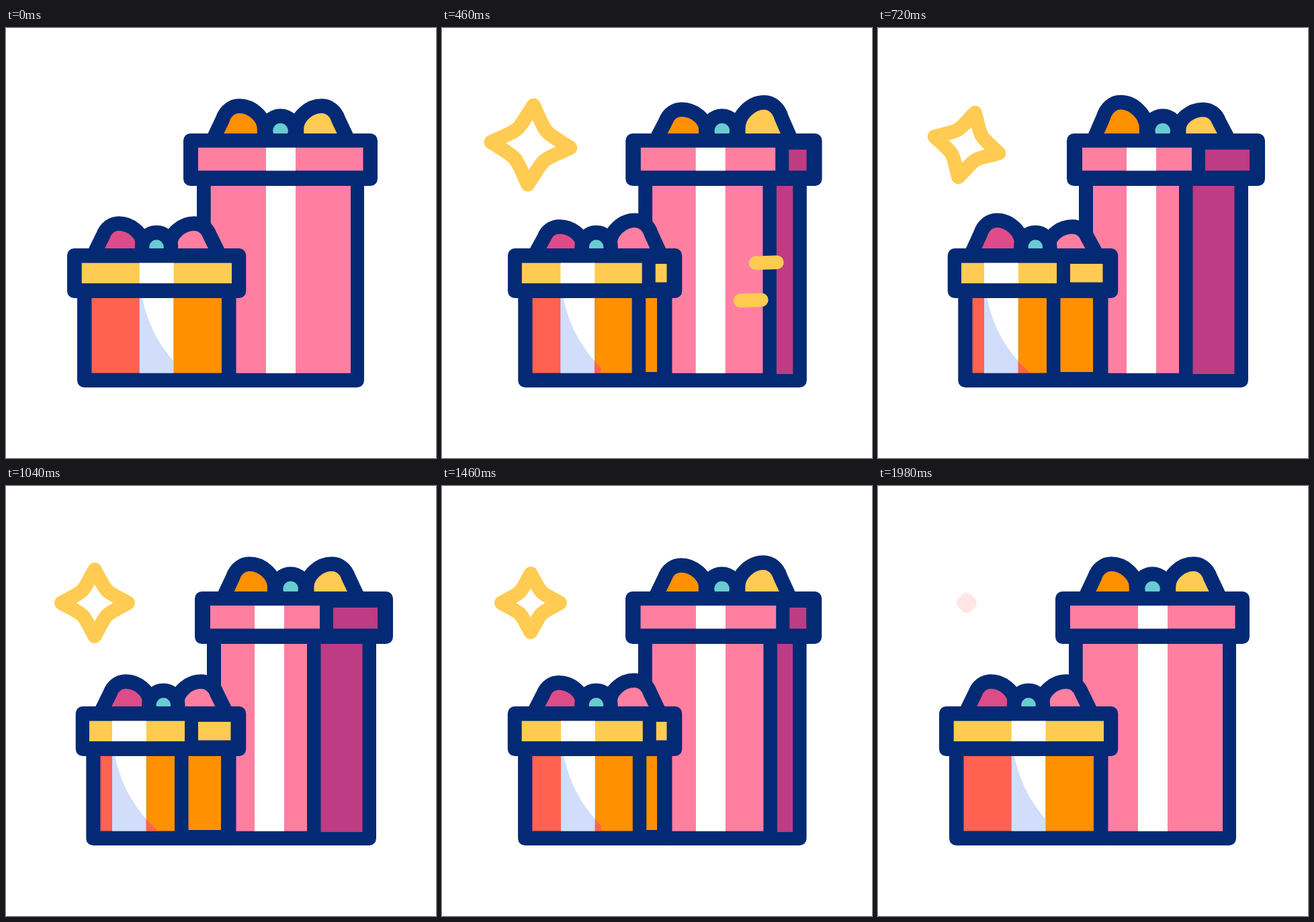
Write an HTML page with a canvas that moves like this. It is 640 px wide and 640 px high and loops after 2100 ms.

```html
<!DOCTYPE html>
<html lang="en">
<head>
<meta charset="utf-8">
<title>Gift boxes</title>
<style>
html, body { margin: 0; width: 100%; height: 100%; overflow: hidden; background: #fff; }
canvas { display: block; width: 640px; height: 640px; }
</style>
</head>
<body>
<canvas id="stage" width="640" height="640"></canvas>
<script>
const ctx = document.getElementById('stage').getContext('2d');
const LOOP = 2100, STEP = 20, LAST = 1980;
const NAVY = '#042a75', PINK = '#ff7fa1', PURPLE = '#bd3c83', ORANGE = '#ff9000',
  YELLOW = '#ffcb52', RED = '#ff6250', TEAL = '#69ccd0', MAGENTA = '#dd4c88',
  SHADE = '#d2ddfc', WHITE = '#fff';

// [time, value] keys joined by sine easing
const TURN = [[195, 0], [695, 1], [1220, 1], [1720, 0]];
const SWAY = [[0, 0], [180, 1.3], [440, -1.1], [710, 1.1], [1040, 0],
  [1300, 1.2], [1580, -1.4], [1850, 1.1], [1980, 0]];
const SIZE = [[20, 0], [380, 61.5], [595, 53.5], [880, 43.5], [1165, 53.5],
  [1450, 43.5], [1735, 53.5], [1980, 4.5]];
const TILT = [[340, 0], [680, 15], [1020, 0]];
const GLOW = [[20, 0], [140, 1], [1900, 1], [1980, 0]];

const lerp = (a, b, u) => a + (b - a) * u;
const ease = u => (1 - Math.cos(Math.PI * Math.min(1, Math.max(0, u)))) / 2;

function track(keys, t) {
  if (t <= keys[0][0]) return keys[0][1];
  for (let i = 1; i < keys.length; i++) {
    const [t0, v0] = keys[i - 1], [t1, v1] = keys[i];
    if (t <= t1) return lerp(v0, v1, ease((t - t0) / (t1 - t0)));
  }
  return keys[keys.length - 1][1];
}

// Rectangle by its edges
function rect(l, t, r, b, color) {
  if (r <= l) return;
  ctx.fillStyle = color;
  ctx.fillRect(l, t, r - l, b - t);
}

function slab(l, t, r, b) {
  ctx.fillStyle = NAVY;
  ctx.beginPath();
  ctx.roundRect(l, t, r - l, b - t, 10.5);
  ctx.fill();
}

function outline(fill) {
  ctx.fillStyle = fill;
  ctx.fill();
  ctx.lineWidth = 21.5;
  ctx.strokeStyle = NAVY;
  ctx.stroke();
}

function loop(x, y, w, h, fill) {
  ctx.save();
  ctx.translate(x, y);
  ctx.scale(w, -h);
  ctx.beginPath();
  ctx.moveTo(1.04, -0.12);
  ctx.lineTo(0.87, 0.51);
  ctx.bezierCurveTo(0.81, 0.83, 0.67, 1, 0.525, 1);
  ctx.bezierCurveTo(0.25, 1, 0, 0.59, 0, 0.17);
  ctx.lineTo(0, -0.12);
  ctx.restore();
  outline(fill);
}

function bow(x, y, gap, w, h, knobY, knobR, sway, left, right) {
  const side = (dir, s, fill) =>
    loop(x + dir * gap, y, dir * w * (1 + 0.035 * s), h * (1 + 0.12 * s), fill);
  side(-1, sway, left);
  side(1, -sway, right);
  ctx.beginPath();
  ctx.arc(x, knobY, knobR, 0, Math.PI * 2);
  outline(TEAL);
}

function bigGift(p, sway) {
  const band = 387 - 17 * p;
  bow(lerp(408.5, 423.7, p), 157, 24, 71.5, 41, 153, 22, sway, ORANGE, YELLOW);

  const div = lerp(513, 448, p), right = lerp(533, 551, p);
  slab(lerp(284, 299, p), 200, right, 535);
  rect(lerp(304.7, 320, p), 233, div, 513.7, PINK);
  rect(band, 233, band + 44, 513.7, WHITE);
  rect(div + 20.5, 235, right - 20.5, 515, PURPLE);

  const lidDiv = lerp(531.5, 467, p), lidRight = lerp(553, 576, p);
  slab(lerp(264, 281, p), 157, lidRight, 235);
  rect(lerp(286, 304, p), 178, lidDiv, 212.3, PINK);
  rect(band, 178, band + 44, 212.3, WHITE);
  rect(lidDiv + 20, 181, lidRight - 23, 212.3, PURPLE);
}

function shade(band, edge) {
  ctx.beginPath();
  ctx.moveTo(band, 401);
  ctx.lineTo(band + 4, 401);
  ctx.quadraticCurveTo(band + 17, 467, band + 68, 513.5);
  ctx.lineTo(band, 513.5);
  ctx.closePath();
  ctx.save();
  ctx.clip();
  rect(band, 401, band + 50.5, 513.5, SHADE);
  rect(band + 50.5, 401, edge, 513.5, RED);
  ctx.restore();
}

function smallGift(p, sway) {
  const band = 198.7 - 40.7 * p, bandEnd = band + 50.8;
  bow(lerp(224, 234.3, p), 328, 20.5, 68, 37, 326, 21.5, sway, MAGENTA, PINK);

  const div = lerp(321, 251, p);
  slab(lerp(106, 119.3, p), 370, 342.5, 535);
  rect(lerp(127.5, 140.5, p), 401, band, 513.5, RED);
  rect(bandEnd, 401, div, 513.5, ORANGE);
  rect(band, 401, bandEnd, 513.5, WHITE);
  shade(band, lerp(249, 226, p));
  rect(div + 20.5, 402, 320, 512, ORANGE);

  const lidDiv = lerp(336, 266, p);
  slab(lerp(91, 103.7, p), 328, 357.3, 402);
  rect(lerp(112.7, 124, p), 349.7, lidDiv, 380, YELLOW);
  rect(band, 349.7, bandEnd, 380, WHITE);
  rect(lidDiv + 20, 351, 334.5, 378.5, YELLOW);
}

function dash(t, x, y) {
  const pos = start => ease((t - start) / 300);
  const head = pos(310), tail = pos(336);
  if (head === tail) return;
  const at = u => [x - 234 * u, y + 8 * (u - 0.43)];
  ctx.beginPath();
  ctx.moveTo(...at(tail));
  ctx.lineTo(...at(head));
  ctx.lineWidth = 20.5;
  ctx.strokeStyle = YELLOW;
  ctx.stroke();
}

function sparkle(t) {
  if (t < 20) return;
  const r = track(SIZE, t), glow = track(GLOW, t);
  ctx.save();
  ctx.translate(132, 174);
  ctx.rotate(track(TILT, t) * Math.PI / 180);
  ctx.beginPath();
  ctx.moveTo(0, -r);
  for (let i = 0; i < 4; i++) {
    ctx.bezierCurveTo(0.42 * r, -0.24 * r, 0.24 * r, -0.42 * r, r, 0);
    ctx.rotate(Math.PI / 2);
  }
  ctx.closePath();
  ctx.lineWidth = 21;
  ctx.strokeStyle = `rgb(255, ${lerp(230, 203, glow)}, ${lerp(230, 82, glow)})`;
  ctx.stroke();
  ctx.restore();
}

function draw(t) {
  const turn = track(TURN, t), sway = track(SWAY, t);
  rect(0, 0, 640, 640, WHITE);
  ctx.lineJoin = ctx.lineCap = 'round';
  bigGift(turn, sway);
  smallGift(turn, sway);
  dash(t, 584, 349.3);
  dash(t, 561, 405.3);
  sparkle(t);
}

let start;
function tick(now) {
  start ??= now;
  const t = (now - start) % LOOP;
  draw(Math.min(LAST, Math.floor(t / STEP) * STEP));
  requestAnimationFrame(tick);
}
draw(0);
requestAnimationFrame(tick);
</script>
</body>
</html>
```
